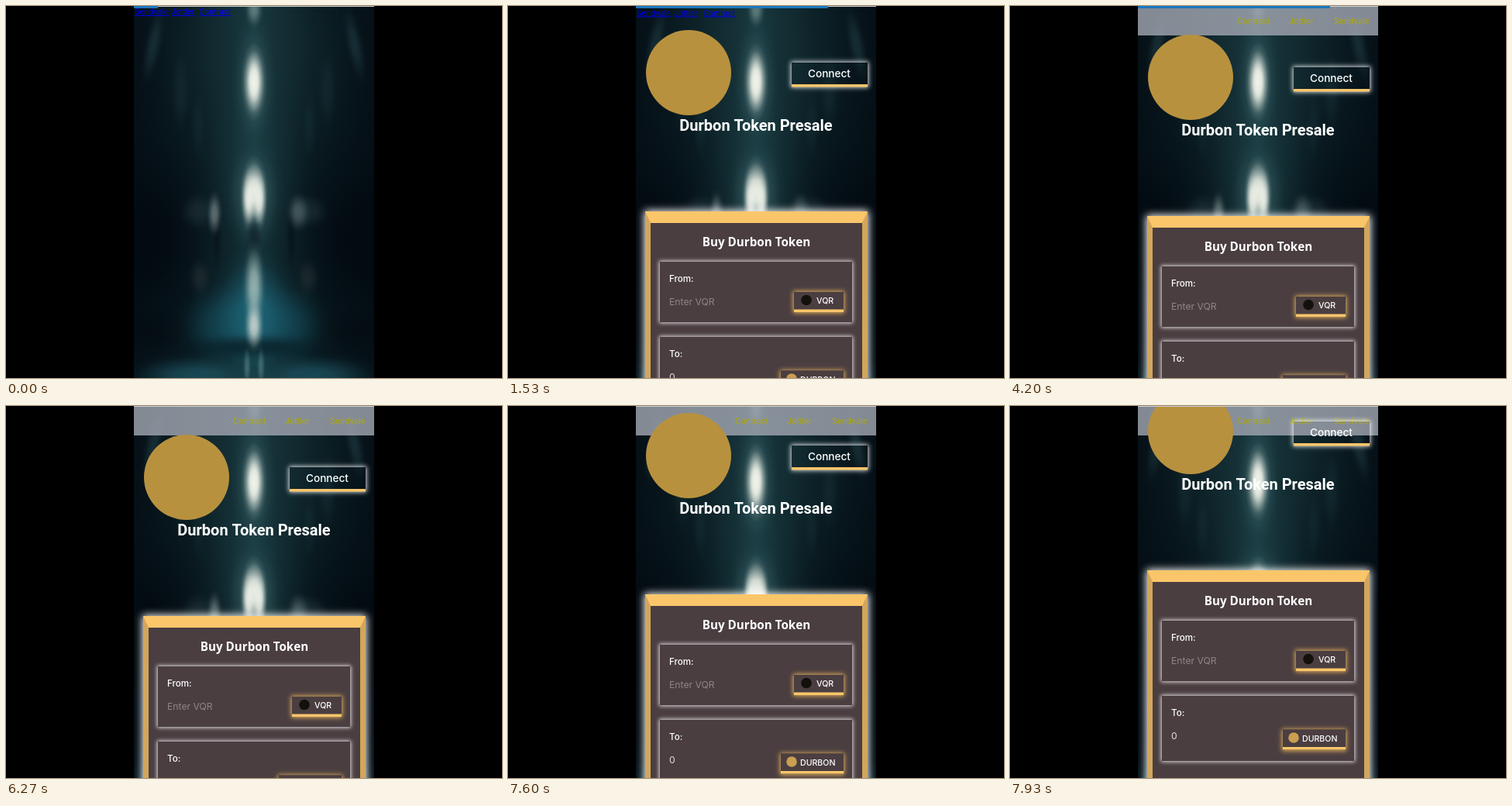
These frames come from a looping animation (640x480 px, 8000 ms). An HTML page with a canvas:

```html
<!DOCTYPE html>
<html lang="en">
<head>
<meta charset="utf-8">
<title>Token presale page</title>
<style>
html, body { margin: 0; width: 100%; height: 100%; overflow: hidden; background: #000; }
canvas { display: block; width: 640px; height: 480px; }
</style>
</head>
<body>
<canvas id="stage" width="640" height="480"></canvas>
<script>
const LOOP = 8000, TICK = 1000 / 15;
const MOUNT = 1200, STYLED = 1800, DRAG = 7463;
const LEFT = 165, WIDTH = 310, RIGHT = LEFT + WIDTH;
const GOLD = '#fbc66a', PANEL = '#4a3e41';
const UI = 'Inter, sans-serif';

const ctx = document.getElementById('stage').getContext('2d');
const backdrop = makeBackdrop();

// Soft elliptical light, optionally tilted
function glow(c, x, y, rx, ry, rgb, alpha, tilt = 0) {
  c.save();
  c.translate(x, y);
  c.rotate(tilt);
  c.scale(rx, ry);
  const g = c.createRadialGradient(0, 0, 0, 0, 0, 1);
  [[0, 1], [0.3, 0.85], [0.55, 0.45], [0.8, 0.1], [1, 0]].forEach(([at, k]) =>
    g.addColorStop(at, `rgba(${rgb},${alpha * k})`));
  c.fillStyle = g;
  c.fillRect(-1, -1, 2, 2);
  c.restore();
}

function makeBackdrop() {
  const canvas = document.createElement('canvas');
  canvas.width = 640;
  canvas.height = 480;
  const c = canvas.getContext('2d');
  c.beginPath();
  c.rect(LEFT, 0, WIDTH, 480);
  c.clip();

  const base = c.createLinearGradient(LEFT, 0, RIGHT, 0);
  [[0, '#050f16'], [0.25, '#08191f'], [0.4, '#0e252b'], [0.5, '#14343a'],
   [0.6, '#0e252b'], [0.75, '#08191f'], [1, '#050f16']]
    .forEach(([at, color]) => base.addColorStop(at, color));
  c.fillStyle = base;
  c.fillRect(LEFT, 0, WIDTH, 480);

  glow(c, 320, 50, 170, 200, '34,72,78', 0.32);
  glow(c, 320, 200, 75, 140, '34,74,80', 0.3);
  for (const s of [-1, 1]) {
    glow(c, 320 + s * 135, 300, 100, 150, '2,8,15', 0.75);
    glow(c, 320 + s * 130, 50, 13, 58, '60,104,110', 0.28, s * -0.2);
    glow(c, 320 + s * 95, 110, 14, 60, '45,80,86', 0.2);
    glow(c, 320 + s * 72, 155, 11, 50, '40,76,82', 0.18);
    glow(c, 320 + s * 48, 295, 8, 55, '4,12,18', 0.5);
    glow(c, 320 + s * 70, 350, 17, 28, '84,86,86', 0.24);
    glow(c, 320 + s * 45, 412, 55, 62, '24,92,110', 0.5);
    glow(c, 320 + s * 75, 478, 100, 32, '36,104,120', 0.6);
    glow(c, 320 + s * 130, 420, 50, 40, '3,10,16', 0.55);
  }
  glow(c, 320, 400, 62, 92, '30,108,128', 0.8);
  glow(c, 320, 440, 115, 20, '6,24,32', 0.7);
  glow(c, 269, 268, 11, 32, '158,174,172', 0.55);
  glow(c, 377, 266, 17, 28, '120,140,142', 0.5);
  glow(c, 248, 265, 28, 28, '70,96,100', 0.25);
  glow(c, 392, 265, 28, 26, '70,96,100', 0.25);

  glow(c, 320, 4, 13, 27, '150,178,176', 0.55);
  glow(c, 320, 98, 30, 88, '90,134,138', 0.38);
  glow(c, 320, 98, 17, 52, '240,243,233', 1);
  glow(c, 320, 98, 10, 38, '240,243,233', 0.7);
  glow(c, 320, 244, 40, 76, '90,134,138', 0.42);
  glow(c, 320, 238, 18, 46, '240,243,233', 0.95);
  for (const s of [-1, 1]) glow(c, 320 + s * 7, 250, 11, 42, '240,243,233', 0.9);
  glow(c, 320, 300, 13, 30, '18,36,42', 0.85);
  glow(c, 320, 362, 16, 62, '178,200,194', 0.8);
  glow(c, 320, 413, 14, 36, '214,222,214', 0.85);
  for (const s of [-1, 1]) glow(c, 320 + s * 9, 465, 6, 30, '110,156,160', 0.45);
  return canvas;
}

function rect(x, y, w, h, color) {
  ctx.fillStyle = color;
  ctx.fillRect(x, y, w, h);
}

function disc(x, y, r, color) {
  ctx.fillStyle = color;
  ctx.beginPath();
  ctx.arc(x, y, r, 0, Math.PI * 2);
  ctx.fill();
}

function text(str, x, y, font, color = '#fff', align = 'left') {
  ctx.font = font;
  ctx.fillStyle = color;
  ctx.textAlign = align;
  ctx.textBaseline = 'alphabetic';
  ctx.fillText(str, x, y);
}

// Blurred light outside a box; the casting shape itself stays off stage
function halo(x, y, w, h, color, blur, spread = 1) {
  const away = 2000;
  ctx.save();
  ctx.beginPath();
  ctx.rect(0, -100, 640, 900);
  ctx.rect(x, y, w, h);
  ctx.clip('evenodd');
  ctx.shadowColor = color;
  ctx.shadowBlur = blur;
  ctx.shadowOffsetX = away;
  ctx.fillStyle = '#000';
  ctx.fillRect(x - spread - away, y - spread, w + 2 * spread, h + 2 * spread);
  ctx.restore();
}

function poly(points, color) {
  ctx.fillStyle = color;
  ctx.beginPath();
  points.forEach(([x, y]) => ctx.lineTo(x, y));
  ctx.fill();
}

function plainLinks(y, gap) {
  const color = '#0000ee';
  [['Sendvale', 166], ['Jottler', 213 + gap / 2], ['Contract', 249 + gap]].forEach(([label, x]) => {
    text(label, x, y, `10px ${UI}`, color);
    rect(x, y + 1, ctx.measureText(label).width, 1, color);
  });
}

function navBar() {
  rect(LEFT, 0, WIDTH, 38, 'rgba(160,165,176,0.82)');
  [['Contract', 293], ['Jottler', 360], ['Sendvale', 418]].forEach(([label, x]) =>
    text(label, x, 23, `500 10.3px ${UI}`, '#aaa616'));
}

function tokenButton(x, y, label, iconX, labelX, color) {
  const w = 433 - x;
  halo(x, y, w, 26, 'rgba(244,190,94,0.9)', 6);
  rect(x, y, w, 26, PANEL);
  rect(x, y + 22.5, w, 3.5, GOLD);
  disc(iconX, y + 10.5, 6.8, color);
  text(label, labelX, y + 15, `500 10.6px ${UI}`);
}

function field(y, h, label, value, valueColor) {
  halo(196, y, 248, h, 'rgba(240,236,238,0.95)', 5);
  text(label, 208, y + 26, `500 11.6px ${UI}`);
  text(value, 208, y + 56, `12.2px ${UI}`, valueColor);
}

function content(dy) {
  ctx.save();
  ctx.translate(0, dy);

  disc(233, 92, 55, '#b8913f');

  halo(366, 79, 98, 31, 'rgba(244,246,248,0.95)', 6);
  rect(366, 107, 98, 3.5, GOLD);
  text('Connect', 414.5, 98, `500 13.6px ${UI}`, '#fff', 'center');

  text('Durbon Token Presale', 320, 167, '700 20px Roboto, sans-serif', '#fff', 'center');

  halo(177, 271, 287, 450, '#fff', 10);
  rect(177, 271, 287, 450, '#d2a65d');
  poly([[177, 271], [464, 271], [457, 286], [184, 286]], GOLD);
  rect(184, 286, 273, 435, PANEL);
  text('Buy Durbon Token', 320.5, 315.5, '800 15.2px "Noto Sans", sans-serif', '#fff', 'center');

  field(336, 78, 'From:', 'Enter VQR', '#8f8587');
  tokenButton(369, 375, 'VQR', 385, 398, '#14110c');
  field(433, 84, 'To:', '0', '#e4e0e1');
  tokenButton(352, 476.5, 'DURBON', 366, 377, '#c9a050');

  ctx.restore();
}

// Linear ramp from 0 to 1 between two times
function ramp(t, from, to) {
  return Math.min(1, Math.max(0, (t - from) / (to - from)));
}

function loadingBar(t) {
  rect(LEFT, 0, WIDTH, 1, '#c6ced2');
  const w = t < MOUNT ? 31 + 111 * ramp(t, 400, 1000) : 248 + 62 * ramp(t, 4800, 5070);
  ctx.globalAlpha = 1 - ramp(t, 5000, 5200);
  rect(LEFT, 0, w, 3, '#1b78bd');
  ctx.globalAlpha = 1;
}

// The drag advances once per tick and slows down
function scrollAt(t) {
  const n = Math.max(0, Math.floor((t - DRAG) / TICK) + 1);
  return Math.round(105 * (1 - Math.exp(-0.1034 * n)));
}

function draw(t) {
  const mounted = t >= MOUNT, styled = t >= STYLED;
  rect(0, 0, 640, 480, '#000');
  ctx.save();
  ctx.beginPath();
  ctx.rect(LEFT, 0, WIDTH, 480);
  ctx.clip();
  ctx.drawImage(backdrop, 0, 0);
  if (styled) navBar();
  else plainLinks(mounted ? 12.5 : 11, mounted ? 3 : 0);
  if (mounted) content(styled ? -scrollAt(t) : -6);
  loadingBar(t);
  ctx.restore();
}

const start = performance.now();
function frame() {
  draw((performance.now() - start) % LOOP);
  requestAnimationFrame(frame);
}
frame();
</script>
</body>
</html>
```
